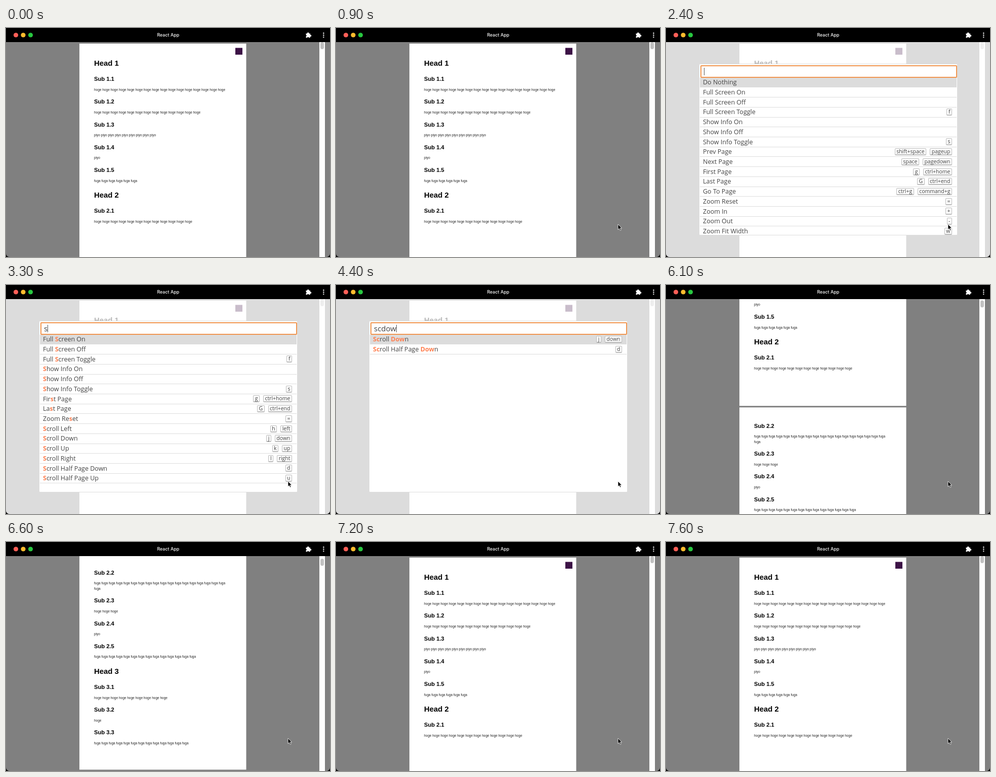
Recreate the animation shown at these times as an HTML page. Size 640 px wide and 455 px high, loop 8000 ms.

```html
<!DOCTYPE html>
<html lang="en">
<head>
<meta charset="utf-8">
<title>React App</title>
<style>
  html, body { margin: 0; width: 100%; height: 100%; overflow: hidden; background: #000; }
  #stage { position: relative; width: 640px; height: 455px; overflow: hidden; background: #000; }
  svg { position: absolute; left: 0; top: 0; display: block; }
  #view { position: absolute; top: 28px; width: 640px; height: 427px; overflow: hidden;
          border-radius: 0 0 7px 7px; background: #808080; }
  .paper { fill: #fff; }
  #doc text { font-family: "Liberation Sans", Arial, sans-serif; font-kerning: none; }
  .head { font-size: 14.9px; font-weight: 700; }
  .sub { font-size: 11.2px; font-weight: 700; }
  .para { font-size: 6.53px; fill: #222; }
  #veil { position: absolute; inset: 0; background: rgba(255, 255, 255, .72); }
  #panel { position: absolute; left: 65px; top: 70.5px; width: 511px; height: 341px; box-sizing: border-box;
           overflow: hidden; background: #fff; border: 1px solid #ddd; border-radius: 2px;
           font: 12.5px "Open Sans", sans-serif; color: #444; }
  #veil, #panel { visibility: hidden; }
  .open #veil, .open #panel { visibility: visible; }
  #field { position: absolute; left: 2px; top: 2px; width: 507px; height: 25px; box-sizing: border-box;
           border: 2px solid #f0954f; border-radius: 2px; padding-left: 5px;
           display: flex; align-items: center; font-size: 15px; line-height: 21px; }
  #caret { width: 1px; height: 15px; background: #555; }
  #list { position: absolute; left: 1px; right: 1px; top: 27.2px; }
  .row { display: flex; align-items: center; height: 19.73px; line-height: 19.73px; box-sizing: border-box;
         padding: 0 9px 0 6px; border-bottom: 1px solid #ddd; white-space: pre; }
  .row:first-child { background: #dcdcdc; }
  .row span { flex: 1; }
  .row b { color: coral; }
  kbd { font: 10.5px/11px "Open Sans", sans-serif; margin-left: 7px; padding: 0 2.5px; height: 11px;
        border: 1px solid #bbb; border-bottom-width: 2px; border-radius: 2px; background: #fcfcfc; color: #444; }
</style>
</head>
<body>
<div id="stage">
  <div id="view">
    <svg width="640" height="427" viewBox="0 28 640 427">
      <g id="doc"></g>
      <rect class="paper" x="619" y="28" width="11" height="427"/>
      <rect id="thumb" x="621" y="28" width="7" height="14" rx="3.5" fill="#c1c1c1"/>
    </svg>
    <div id="veil"></div>
  </div>
  <div id="panel">
    <div id="field"><span id="typed"></span><i id="caret"></i></div>
    <div id="list"></div>
  </div>
  <svg width="640" height="455">
    <circle cx="19.5" cy="14" r="4.6" fill="#ff5f57"/>
    <circle cx="34" cy="14" r="4.6" fill="#febc2e"/>
    <circle cx="48.5" cy="14" r="4.6" fill="#28c840"/>
    <text x="320.3" y="17.2" text-anchor="middle" fill="#fff" font-family="Inter, sans-serif" font-size="8.9" font-weight="500">React App</text>
    <g fill="#fff">
      <path d="M592.5 11h2.6a1.7 1.7 0 1 1 3.2 0h2.7v2.7a1.7 1.7 0 1 1 0 3.2v2.4h-2.8a1.6 1.6 0 0 0-3.1 0h-2.6v-2.6a1.6 1.6 0 0 0 0-3.1z"/>
      <circle cx="627.3" cy="10.3" r="1.2"/><circle cx="627.3" cy="14.2" r="1.2"/><circle cx="627.3" cy="18.1" r="1.2"/>
    </g>
    <path id="mouse" d="M0 0V10.6L2.5 8.4 4.2 12.2 6 11.4 4.4 7.7H7.6Z" fill="#000" stroke="#fff" stroke-width=".8"/>
  </svg>
</div>
<script>
const $ = id => document.getElementById(id);
const LOOP = 8000, STEP = 100;

// Paragraphs are "word count" pairs
const PAGES = [
  { top: 31, y: 70, lines: ["Head 1", "Sub 1.1", "hoge 16", "Sub 1.2", "hoge 13", "Sub 1.3", "piyo 9",
    "Sub 1.4", "piyo 1", "Sub 1.5", "fuga 6", "Head 2", "Sub 2.1", "hoge 12"] },
  { top: 462, y: 498.5, lines: ["Sub 2.2", "fuga 18", "fuga 1", "Sub 2.3", "hoge 3", "Sub 2.4", "piyo 1",
    "Sub 2.5", "fuga 14", "Head 3", "Sub 3.1", "hoge 9", "Sub 3.2", "hoge 1", "Sub 3.3", "fuga 13"] }
];
const GAP = { "head sub": 31.1, "sub para": 21.5, "para sub": 23.7, "para head": 28.6, "para para": 10.3 };
const BASE = { head: 5.3, sub: 4, para: 2.1 };
const kind = s => /^Head/.test(s) ? "head" : /^Sub/.test(s) ? "sub" : "para";

function pageSvg({ top, y, lines }) {
  let out = `<rect class="paper" x="145" y="${top}" width="329.5" height="428"/>`, prev;
  for (const line of lines) {
    const k = kind(line), [word, n] = line.split(" ");
    if (prev) y += GAP[prev + " " + k];
    const text = k === "para" ? Array(+n).fill(word).join(" ") : line;
    out += `<text class="${k}" x="174" y="${y + BASE[k]}">${text}</text>`;
    prev = k;
  }
  return out;
}
$("doc").innerHTML = PAGES.map(pageSvg).join("") +
  '<rect x="453" y="39.5" width="14" height="13.5" fill="#3c1246"/>';

const COMMANDS = `Do Nothing
Full Screen On
Full Screen Off
Full Screen Toggle|f
Show Info On
Show Info Off
Show Info Toggle|s
Prev Page|shift+space|pageup
Next Page|space|pagedown
First Page|g|ctrl+home
Last Page|G|ctrl+end
Go To Page|ctrl+g|command+g
Zoom Reset|=
Zoom In|+
Zoom Out|-
Zoom Fit Width|w
Zoom Fit Height|e
Scroll Left|h|left
Scroll Down|j|down
Scroll Up|k|up
Scroll Right|l|right
Scroll Half Page Down|d
Scroll Half Page Up|u`.split("\n").map(s => s.split("|"));

// Fuzzy match: marks the query letters in order, or gives null
function mark(label, query) {
  let i = 0, out = "";
  for (const c of label) {
    const hit = i < query.length && c.toLowerCase() === query[i];
    if (hit) i++;
    out += hit ? `<b>${c}</b>` : c;
  }
  return i === query.length ? out : null;
}

function showList(query) {
  $("typed").textContent = query;
  $("list").innerHTML = COMMANDS.map(([label, ...keys]) => {
    const text = mark(label, query);
    return text === null ? "" :
      `<div class="row"><span>${text}</span>${keys.map(k => `<kbd>${k}</kbd>`).join("")}</div>`;
  }).join("");
}

const OPEN = 2400, CLOSE = 4600, FIRST_PAGE = 7000, LINE = 109.4;
const TYPING = [[3300, "s"], [3400, "sc"], [3500, "scdo"], [3600, "scdow"]];
const SCROLL_DOWN = [CLOSE, 6100, 6250, 6400];

let lastTick = -1, lastQuery = null;
function draw(t) {
  $("stage").className = t >= OPEN && t < CLOSE ? "open" : "";

  const query = TYPING.reduce((q, [at, s]) => t >= at ? s : q, "");
  if (query !== lastQuery) showList(lastQuery = query);
  const blink = (t >= 2900 && t < 3300) || (t >= 4000 && t < 4400);
  $("caret").style.opacity = blink ? 0 : 1;

  // Each command jumps at once
  const y = t < FIRST_PAGE ? LINE * SCROLL_DOWN.filter(at => t >= at).length : 0;
  $("doc").setAttribute("transform", `translate(0 ${-y})`);
  $("thumb").setAttribute("y", 28 + y * 0.0118);

  const left = (1 - Math.min(1, Math.max(0, (t - 500) / 400))) ** 2;
  $("mouse").setAttribute("transform", `translate(${557 + 56 * left} ${390 + 30 * left})`);
  $("mouse").style.visibility = t < 500 ? "hidden" : "visible";
}

const start = performance.now();
function tick() {
  const t = Math.floor(((performance.now() - start) % LOOP) / STEP) * STEP;
  if (t !== lastTick) draw(lastTick = t);
  requestAnimationFrame(tick);
}
tick();
</script>
</body>
</html>
```
